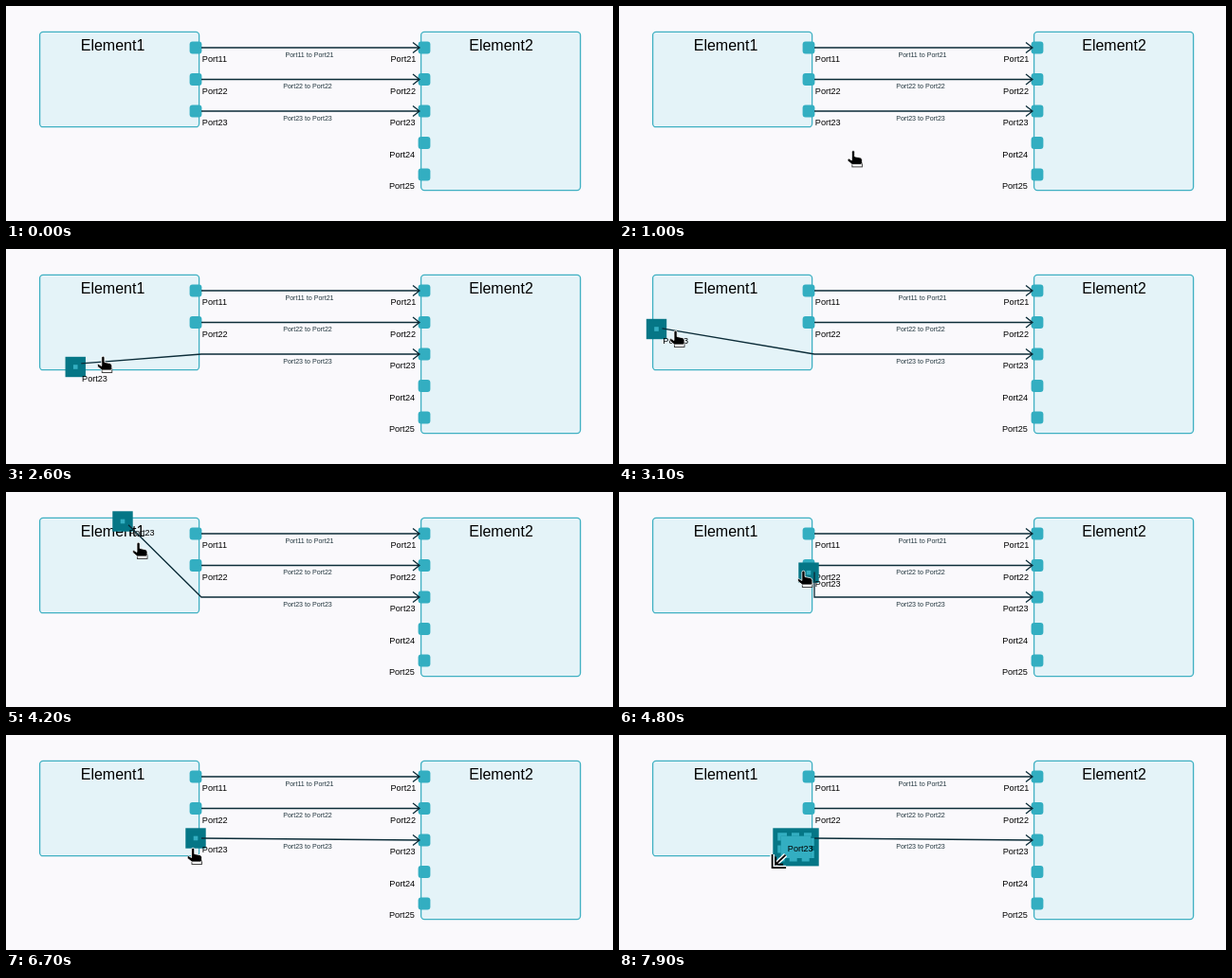
Write an HTML page that moves like this. It is 640x227 px and loops after 8 s.

```html
<!DOCTYPE html>
<html lang="en">
<head>
<meta charset="utf-8">
<title>Moving and resizing a port</title>
<style>
  html, body { margin: 0; width: 100%; height: 100%; overflow: hidden; background: #faf9fc; }
  svg { display: block; width: 640px; height: 227px; font-family: "Liberation Sans", Arial, sans-serif; }
  .box { fill: #e4f3f8; stroke: #3fb0c2; stroke-width: 1.3; }
  .title { font-size: 16px; text-anchor: middle; }
  .port { fill: #33aec1; }
  .name { font-size: 9.15px; }
  .edge { fill: none; stroke: #0b2c38; stroke-width: 1.3; }
  .edge-name { font-size: 7.1px; text-anchor: middle; fill: #22363e; }
  .frame { fill: #057686; }
  .dashes { fill: none; stroke: #33aec1; stroke-width: 3.5; stroke-dasharray: 8 5; }
  .halo { fill: none; stroke: #fff; stroke-width: 4.6; }
  .ink { fill: none; stroke: #000; stroke-width: 1.8; }
</style>
</head>
<body>
<svg viewBox="0 0 640 227">
  <rect class="box" x="35.6" y="27.4" width="168" height="100.3" rx="3.5"/>
  <rect class="box" x="437.6" y="27.4" width="168" height="167.2" rx="3.5"/>
  <text class="title" x="112.5" y="46.8">Element1</text>
  <text class="title" x="522" y="46.8">Element2</text>
  <g id="fixed"></g>
  <path id="rail" fill="none" d="M200 111V124.5H39.5V31H200V105.5"/>
  <rect id="frame" class="frame"/>
  <rect id="body" class="port"/>
  <rect id="dashes" class="dashes"/>
  <text id="label" class="name">Port23</text>
  <path id="edge" class="edge"/>
  <text id="edgeName" class="edge-name" x="318">Port23 to Port23</text>
  <g id="hand">
    <rect x="5.5" y="13" width="10.5" height="4.5" fill="#fff" stroke="#333" stroke-width=".9"/>
    <path d="M5 10.5V1.8a1.6 1.6 0 0 1 3.2 0V6.5l5.8 1.2q2 .5 2 2.5v3.3l-1 1.5H5.5L.9 11.3q-1-2.2 .9-2.7z"
          stroke="#fff" stroke-width=".8"/>
  </g>
  <g id="resize">
    <path class="halo" d="M2 2V16H16.5M16 2.5L5 13"/>
    <path class="ink" d="M2 2V16H16.5M5.5 4.5V12.5H13.5M16 2.5L6 12"/>
  </g>
</svg>
<script>
const LOOP = 8000, STEP = 100, HALF = 6.4, ROW = 33.5;
const GRAB = 1800, DROP = 5400, SETTLE = 5600, LEAVE = 6300, CORNER = 7200;
const NS = 'http://www.w3.org/2000/svg';
const $ = id => document.getElementById(id);

function set(el, attrs) {
  for (const key in attrs) el.setAttribute(key, attrs[key]);
  return el;
}

function add(tag, attrs, text = '') {
  const el = set(document.createElementNS(NS, tag), attrs);
  el.textContent = text;
  $('fixed').append(el);
}

const rowY = i => 44 + i * ROW;
const arrow = y => `M429 ${y - 5.6}L436 ${y}L429 ${y + 5.6}`;

function addPort(x, y, labelX, name) {
  add('rect', { class: 'port', x: x - HALF, y: y - HALF, width: 2 * HALF, height: 2 * HALF, rx: 3 });
  add('text', { class: 'name', x: labelX, y: y + 15 }, name);
}

function addEdge(y, labelX, name) {
  add('path', { class: 'edge', d: `M206 ${y}H436${arrow(y)}` });
  add('text', { class: 'edge-name', x: labelX, y: y + 9.5 }, name);
}

['Port11', 'Port22'].forEach((name, i) => addPort(200, rowY(i), 206.8, name));
for (let i = 0; i < 5; i++) addPort(441, rowY(i), 405.5 - 0.4 * i, 'Port2' + (i + 1));
addEdge(rowY(0), 320, 'Port11 to Port21');
addEdge(rowY(1), 318, 'Port22 to Port22');

// Time, distance of the port along the rail, hand x, hand y
const drag = [
  [GRAB, 0, 194, 113],
  [2100, 66.5, 138.5, 140],
  [3100, 214, 53, 86],
  [4200, 351, 133, 53],
  [4500, 472, 186, 76],
  [DROP, 502.5, 191.5, 97]
];

const clamp = f => Math.min(1, Math.max(0, f));
const mix = (a, b, f) => a + (b - a) * f;

function dragAt(t) {
  const time = Math.min(DROP, Math.max(GRAB, t));
  const i = drag.findIndex((key, n) => n > 0 && key[0] >= time);
  const [a, b] = [drag[i - 1], drag[i]];
  return a.map((v, n) => mix(v, b[n], (time - a[0]) / (b[0] - a[0])));
}

function cursorAt(t, box, handX, handY) {
  if (t < GRAB) {
    const f = clamp((t - 100) / 1600);
    return [mix(300, handX, f), mix(203, handY, f)];
  }
  if (t < LEAVE) return [handX, handY];
  if (t < CORNER) return [190.5, 119 + Math.abs(t - 6700) * 0.06];
  return [box.x - 7, box.y + box.h - 10];
}

const show = (el, on) => el.style.display = on ? '' : 'none';

function inset(el, box, d) {
  set(el, { x: box.x + d, y: box.y + d, width: box.w - 2 * d, height: box.h - 2 * d });
}

function draw(t) {
  const [, distance, handX, handY] = dragAt(t);
  const settled = t >= SETTLE;
  const { x, y } = settled ? { x: 200, y: 109 } : $('rail').getPointAtLength(distance);
  const grow = clamp((t - 7300) / 600);
  const box = {
    x: x - HALF - 27 * grow, y: y - HALF,
    w: 2 * HALF + 27 * grow, h: 2 * HALF + 18.7 * grow
  };
  const selected = t >= 1700;

  show($('frame'), selected);
  inset($('frame'), box, -4.3);
  inset($('body'), box, selected ? 4.1 : 0);
  set($('body'), { rx: selected ? 0 : 3 });
  show($('dashes'), grow > 0.1);
  inset($('dashes'), box, 2.4);
  set($('label'), { x: box.x + 13.2 - 2 * grow, y: box.y + 21.4 - grow });

  // While dragged, the edge keeps its old bend and starts on the inner side of the port.
  const startY = settled ? y : mix(y, 78, t < GRAB ? 0 : 0.08);
  const bend = settled ? '' : 'L206 111';
  set($('edge'), { d: `M${x + 6} ${startY}${bend}L436 111${arrow(111)}` });
  set($('edgeName'), { y: settled ? 119.5 : 120.5 });

  const resizing = (t >= DROP && t < LEAVE) || t >= CORNER;
  const place = { transform: `translate(${cursorAt(t, box, handX, handY)})` };
  show(set($('hand'), place), t >= 100 && !resizing);
  show(set($('resize'), place), resizing);
}

function tick() {
  draw(Math.floor(performance.now() % LOOP / STEP) * STEP);
  requestAnimationFrame(tick);
}
tick();
</script>
</body>
</html>
```
